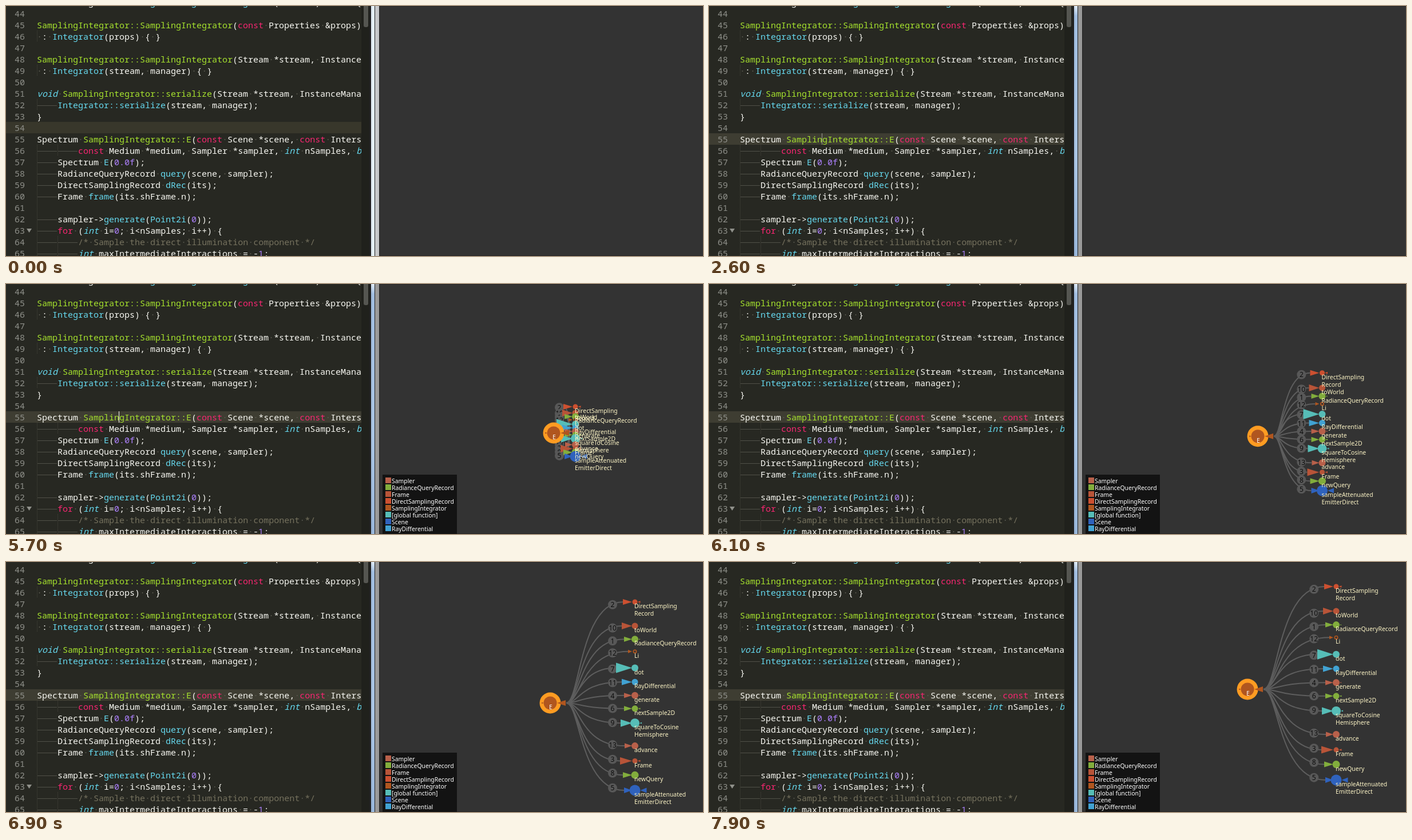
Recreate the animation shown at these times as an HTML page. Size 1218 by 438 pixels, loop 8000 ms.

```html
<!DOCTYPE html>
<html lang="en">
<head>
<meta charset="utf-8">
<title>Code editor with call graph</title>
<style>
  html, body { margin: 0; width: 100%; height: 100%; overflow: hidden; background: #333; }
  svg { display: block; }
  text { white-space: pre; }
  .code { font: 15px "Noto Sans Mono", monospace; fill: #f8f8f2; }
  .graph { font: 10.4px "Noto Sans", sans-serif; fill: #fff; }
  .num { fill: #8f908a; text-anchor: end; }
  .dim { fill: #5c5c52; }
  .note { fill: #75715e; }
  .key { fill: #f92672; }
  .type { fill: #66d9ef; font-style: italic; }
  .def { fill: #a6e22e; }
  .call { fill: #66d9ef; }
  .lit { fill: #ae81ff; }
  .label { fill: #fdf5c6; }
  .badge { font-size: 12px; fill: #0c0c0c; text-anchor: middle; }
</style>
</head>
<body>
<svg width="1218" height="438" viewBox="0 0 1218 438">
  <defs>
    <clipPath id="pane"><rect width="621" height="438"/></clipPath>
    <linearGradient id="glass" x2="0" y2="1">
      <stop offset="0" stop-color="#dfeaf5"/>
      <stop offset=".04" stop-color="#a0bde0"/>
      <stop offset=".6" stop-color="#aac5e4"/>
      <stop offset="1" stop-color="#98b6da"/>
    </linearGradient>
  </defs>
  <rect width="638" height="438" fill="#272822"/>
  <g id="marks"></g>
  <g id="code" class="code" clip-path="url(#pane)"></g>
  <rect id="caret" x="197" y="223" width="1" height="20" fill="#f8f8f0"/>
  <path d="M36 390h9l-4.500 7z" fill="#8f908a"/>
  <rect x="621" width="14" height="438" fill="#20211c"/>
  <rect x="625" y="-10" width="8" height="47" rx="3" fill="#555651"/>
  <rect x="635" width="18" height="438" fill="#222"/>
  <rect id="edgeL" x="638" width="6" height="438"/>
  <rect id="edgeR" x="645" width="7" height="438"/>
  <rect x="653" width="565" height="438" fill="#333"/>
  <path d="M653 .5h565M653 437.500h565" stroke="#262425"/>
  <g id="graph" class="graph"></g>
</svg>
<script>
const $ = id => document.getElementById(id);
const LOOP = 8000, FIRST = 43;
const rowTop = n => 223 + (n - 55) * 20;
const rect = (x, y, w, h, fill, more = '') =>
  `<rect x="${x}" y="${y}" width="${w}" height="${h}" fill="${fill}" ${more}/>`;
const circle = (x, y, r, fill) => `<circle cx="${x}" cy="${y}" r="${r}" fill="${fill}"/>`;
const text = (x, y, s, cls = '') => `<text x="${x}" y="${y}" class="${cls}">${s}</text>`;
// Triangle with its base at x and its tip at tipX
const wedge = (x, tipX, y, half, fill) =>
  `<path d="M${x} ${y - half}V${y + half}L${tipX} ${y}z" fill="${fill}"/>`;

const source = `const Integrator *Integrator::getSubIntegrator(int idx) const { return NULL; }

SamplingIntegrator::SamplingIntegrator(const Properties &props)
 : Integrator(props) { }

SamplingIntegrator::SamplingIntegrator(Stream *stream, InstanceManager *manager)
 : Integrator(stream, manager) { }

void SamplingIntegrator::serialize(Stream *stream, InstanceManager *manager) const {
\tIntegrator::serialize(stream, manager);
}

Spectrum SamplingIntegrator::E(const Scene *scene, const Intersection &its,
\t\tconst Medium *medium, Sampler *sampler, int nSamples, bool handleIndirect) const {
\tSpectrum E(0.0f);
\tRadianceQueryRecord query(scene, sampler);
\tDirectSamplingRecord dRec(its);
\tFrame frame(its.shFrame.n);

\tsampler->generate(Point2i(0));
\tfor (int i=0; i<nSamples; i++) {
\t\t/* Sample the direct illumination component */
\t\tint maxIntermediateInteractions = -1;`.split('\n');

const escape = s => s.replace(/&/g, '&amp;').replace(/</g, '&lt;');
const dots = s => escape(s).replace(/ +/g, m => `<tspan class="dim">${'·'.repeat(m.length)}</tspan>`);
const token = /(?<note>\/\*.*\*\/)|\b(?<key>const|for|return)\b|\b(?<type>void|int|bool)\b|(?<def>SamplingIntegrator::\w+)|(?<call>(Integrator::)?\w+(?=\())|\b(?<lit>\d[\d.f]*)/g;

function paint(line) {
  let out = '', end = 0;
  for (const m of line.matchAll(token)) {
    const cls = Object.keys(m.groups).find(k => m.groups[k]);
    out += dots(line.slice(end, m.index)) + `<tspan class="${cls}">${dots(m[0])}</tspan>`;
    end = m.index + m[0].length;
  }
  return out + dots(line.slice(end));
}

$('code').innerHTML = source.map((line, i) => {
  const n = FIRST + i, y = rowTop(n), body = line.trimStart();
  const tabs = line.lastIndexOf('\t') + 1;
  let out = text(33, y + 16, n, 'num');
  const guides = n === 61 ? 1 : tabs || +line.startsWith(' ');
  for (let g = 0; g < guides; g++) {
    const x = 54 + g * 36;
    out += `<path d="M${x + .5} ${y}v20" stroke="#45453c" stroke-dasharray="1 1"/>`;
    if (g < tabs) out += `<path d="M${x + 1} ${y + 11.5}h34" stroke="#505048"/>`;
  }
  return out + text(54 + tabs * 36, y + 16, paint(tabs ? body : line));
}).join('');

const RUST = '#b0561f', CORAL = '#b8604a', LIME = '#82ad3c', BRICK = '#b85438',
  RED = '#cc5030', TEAL = '#56bdb7', BLUE = '#2f62bd', SKY = '#41a2d2';
const legend = [['Sampler', CORAL], ['RadianceQueryRecord', LIME], ['Frame', BRICK],
  ['DirectSamplingRecord', RED], ['SamplingIntegrator', RUST], ['[global function]', TEAL],
  ['Scene', BLUE], ['RayDifferential', SKY]];

// label, call order, colour, radius, wedge length, wedge half height, place in the fan, tail length
const calls = [
  ['DirectSampling/Record', 2, RED, 4.5, 21, 5, 0, 4],
  ['toWorld', 10, BRICK, 5.5, 23, 6, .127, 0],
  ['RadianceQueryRecord', 1, LIME, 6, 19, 4.5, .198, 2],
  ['Li', 12, RUST, 3.5, 12, 3, .263, 0],
  ['dot', 7, TEAL, 6, 33, 9, .35, 0],
  ['RayDifferential', 11, SKY, 5.5, 23, 5.5, .425, 0],
  ['generate', 4, CORAL, 6, 19, 4.5, .496, 2],
  ['nextSample2D', 6, LIME, 5.5, 19, 4.5, .566, 3],
  ['squareToCosine/Hemisphere', 9, TEAL, 8, 25, 6.5, .643, 3],
  ['advance', 13, CORAL, 6, 18, 4.5, .764, 0],
  ['Frame', 3, BRICK, 4.5, 26, 6.5, .844, 4],
  ['newQuery', 8, LIME, 6.5, 21, 5, .919, 0],
  ['sampleAttenuated/EmitterDirect', 5, BLUE, 9.5, 19, 5, 1, 10]
];

// time, x, y
const rootPath = [[3900, 932, 207], [4200, 927, 214], [4500, 925, 217], [4700, 927, 217],
  [5200, 938, 217], [5300, 938, 217], [5400, 945, 236], [5700, 957, 261], [6200, 959, 267],
  [6500, 957.5, 264], [6900, 951, 247], [7300, 944.5, 231], [7900, 941, 223]];
// time, x, top, bottom
const fanPath = [[5400, 972, 242, 272], [5700, 995, 215, 302], [6200, 1087, 141, 376],
  [6500, 1098, 101.5, 407.5], [6900, 1099, 70, 400], [7300, 1097.5, 53, 389], [7900, 1096, 43, 382]];

// Smooth curve through timed points
function along(path, t) {
  const i = path.findIndex(p => p[0] > t);
  if (i < 1) return i ? path[path.length - 1] : path[0];
  const a = path[i - 1], b = path[i], before = path[i - 2] || a, after = path[i + 1] || b;
  const h = b[0] - a[0], u = (t - a[0]) / h, v = 1 - u;
  const slope = (p, q, j) => (q[j] - p[j]) / (q[0] - p[0]);
  return a.map((_, j) => v * v * (1 + 2 * u) * a[j] + u * u * (3 - 2 * u) * b[j]
    + h * u * v * (v * slope(before, b, j) - u * slope(a, after, j)));
}

function drawCalls(t, rx, ry) {
  const [, x, top, bottom] = along(fanPath, t);
  const badgeX = x - 28 - 11 * Math.min(1, Math.max(0, (x - 995) / 103));
  let edges = '', badges = '', nodes = '', labels = '';
  for (const [name, order, color, r, len, half, place, tail] of calls) {
    const y = top + (bottom - top) * place, by = y + (ry - y) * .027;
    const sx = rx + 28, ex = x - len, bend = sx + Math.max(0, ex - sx) * .24;
    edges += `<path d="M${sx} ${ry}C${bend} ${ry} ${bend} ${y} ${ex} ${y}"/>`;
    badges += circle(badgeX, by, 8, '#585858') + text(badgeX, by + 4.5, order, 'badge');
    nodes += wedge(x - len, x - 5, y, half, color) + circle(x, y, r, color);
    if (name === 'Li') nodes += circle(x, y, 1.8, '#333');
    if (tail) nodes += wedge(x + r + 1 + tail, x + r, y, tail / 2.2, color);
    name.split('/').forEach((s, i) => labels += text(x - 1, y + 11 + i * 13, s, 'label'));
  }
  return `<g fill="none" stroke="#5e5e5e" stroke-width="2">${edges}</g>${badges}${nodes}${labels}`;
}

function drawGraph(t) {
  if (t < 3900) return '';
  const [, x, y] = along(rootPath, t), open = t >= 5400;
  const rows = open ? legend : [legend[4]], top = 430 - rows.length * 12;
  let out = rect(658, top, open ? 130 : 114, 438 - top, '#131313');
  rows.forEach(([name, color], i) => {
    out += rect(663, top + 5 + i * 12, 10, 10, color) + text(674, top + 15 + i * 12, name);
  });
  if (open) out += drawCalls(t, x, y);
  return out + circle(x, y, 18.5, '#ff9c22') + circle(x, y, 11.5, RUST)
    + wedge(x - 15, x - 11, y, 1.5, RUST) + wedge(x + 27, x + 12, y, 5, RUST)
    + text(x - 2, y + 11, 'E');
}

function drawMarks(t) {
  if (t < 800) return rect(0, 203, 621, 20, '#38372b');
  if (t >= 1500) return rect(0, 223, 621, 20, '#3e3d32');
  let out = rect(0, 223, 49, 20, '#3e3d32') + rect(135, 223, 162, 20, '#49483e', 'rx="2"');
  if (t >= 1000)
    for (const [x, n] of [[54, 45], [234, 45], [54, 48], [234, 48], [99, 51], [135, 55]])
      out += rect(x - .5, rowTop(n) + .5, 162, 20, 'none', 'rx="3" stroke="#85857c"');
  return out;
}

// Blinks every 950 ms, fading in and out
function caretAlpha(t) {
  if (t < 1500) return 0;
  const phase = (t - 1500 + 800) % 950;
  return Math.max(0, Math.min(1, (phase + 60) / 120, (460 - phase) / 120) || 0,
    (phase - 890) / 120);
}

function frame(now) {
  const t = Math.floor(now % LOOP / 100) * 100, focused = t >= 800;
  $('marks').innerHTML = drawMarks(t);
  $('graph').innerHTML = drawGraph(t);
  $('caret').setAttribute('opacity', caretAlpha(t));
  $('edgeL').setAttribute('fill', focused ? 'url(#glass)' : '#e2edf4');
  $('edgeR').setAttribute('fill', focused ? '#9a9a9a' : '#c6c8ca');
  requestAnimationFrame(frame);
}
requestAnimationFrame(frame);
</script>
</body>
</html>
```
